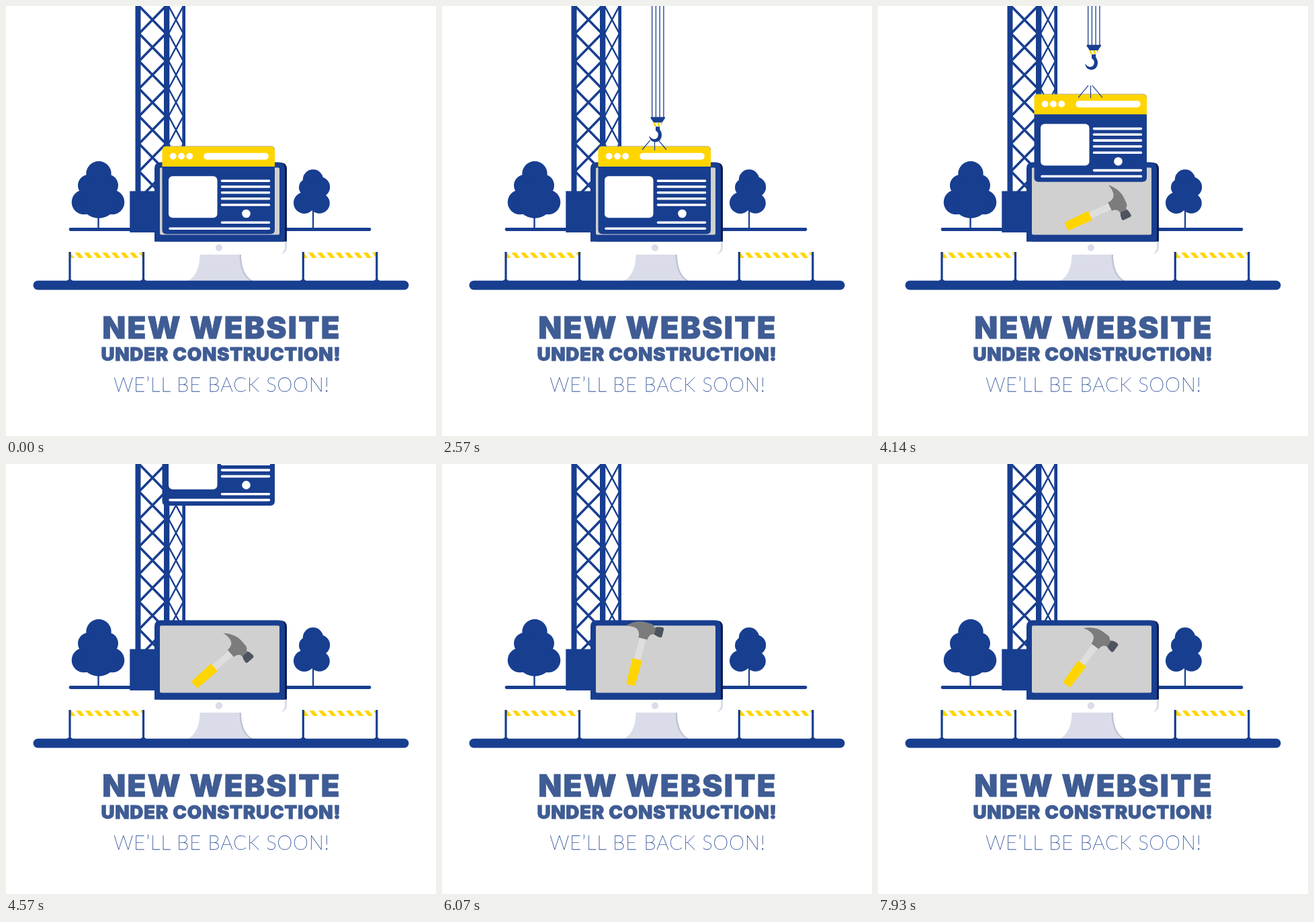
Write an HTML page that moves like this. It is 640x640 px and loops after 8000 ms.

```html
<!DOCTYPE html>
<html lang="en">
<head>
<meta charset="utf-8">
<title>New website under construction</title>
<style>
  html, body { margin: 0; width: 100%; height: 100%; overflow: hidden; background: #fff; }
  svg { display: block; width: 100vw; height: 100vh; }
  text { font-family: Inter, "Open Sans", sans-serif; text-anchor: middle; }
  .b { fill: #183e90; }
  .w { fill: #fff; }
  .y { fill: #ffd500; }
  .line { fill: none; stroke: #183e90; }
  .rule { fill: none; stroke: #fff; stroke-width: 3.6; stroke-linecap: round; }
  .head { fill: #3f5c94; stroke: #3f5c94; stroke-width: .8; font-weight: 900; }
  .soon { fill: #183e90; stroke: #183e90; stroke-width: .3; font-weight: 100; font-family: Lato, Inter, sans-serif; }
</style>
</head>
<body>
<svg viewBox="0 0 640 640">
  <defs>
    <pattern id="tape" width="13.6" height="8" patternUnits="userSpaceOnUse">
      <path class="y" d="M0 0H6.8L12.8 8H6Z"/>
    </pattern>
    <g id="fence">
      <rect x="1.5" y="367" width="110" height="8" fill="#fff"/>
      <svg x="1.5" y="367" width="110" height="8">
        <g class="band"><rect x="-14" width="150" height="8" fill="url(#tape)"/></g>
      </svg>
      <path class="b" d="M0 366H3.2V407L6 409H-3L0 407ZM109.5 366H112.7V407L115.5 409H106.5L109.5 407Z"/>
    </g>
  </defs>

  <path class="line" d="M96 332.5H541" stroke-width="4.8" stroke-linecap="round"/>
  <g id="trees" class="b">
    <path d="M136.3 300H138.7V332H136.3ZM456 295H458.2V332H456Z"/>
  </g>

  <path class="line" id="braceA" stroke-width="3.6"/>
  <path class="line" id="braceB" stroke-width="2.4"/>
  <path class="b" d="M192.5 0H200.5V280H192.5ZM235 0H243.3V240H235ZM262.3 0H267V240H262.3Z"/>
  <rect class="b" x="184.3" y="275.5" width="42" height="61.5"/>

  <path d="M221 370V350H418V360Q418 370 408 370Z" fill="#fff"/>
  <path d="M415 350H418V360Q418 368 408 369.5Q415 366 415 359Z" fill="#dadde9"/>
  <path d="M230 233H409Q418 233 418 243V350.5H230Z" fill="#08194f"/>
  <path class="b" d="M221 350.8V242Q221 232.6 230.5 232.6H405.5Q415 232.6 415 242V350.8Z"/>
  <rect x="229" y="240.5" width="178" height="100" rx="2" fill="#d0d0d0"/>
  <circle cx="317" cy="359.6" r="5.2" fill="#dadde9"/>
  <path d="M288.5 370H350C350 386 354 402 367.5 409H271C284 402 288.5 386 288.5 370Z" fill="#dadde9"/>
  <path d="M347.5 370H350C350 386 354 402 367.5 409H364C351 401 348 386 347.5 370Z" fill="#bfc3d3"/>

  <g id="hammer">
    <rect x="34" y="-5" width="42" height="10" fill="#dedede"/>
    <path class="y" d="M1 -6.7L37.5 -7.5Q38.500 -7.500 38.500 -6.500V6.500Q38.500 7.500 37.500 7.500L1 6.700Q-1 6.500 -1 5V-5Q-1 -6.500 1 -6.700Z"/>
    <path fill="#7c7c7c" d="M82 -30C88 -24 95 -14 95 -4V6Q95 10 91.500 12L91 17H81L80 12Q78 7.500 70.500 7V-6.500Q76 -6.500 79.500 -9C85 -13 84.500 -22 82 -30Z"/>
    <path fill="#4d535f" d="M81 15H92Q94 19 94 25Q93 27 91 27H81Q79 27 78.500 25Q78.500 19 81 15Z"/>
  </g>

  <g id="page">
    <path class="b" d="M232.5 238H400V333Q400 339.5 393.5 339.5H239Q232.5 339.5 232.5 333Z"/>
    <path class="y" d="M232.5 239V214.5Q232.5 209 238 209H394.5Q400 209 400 214.5V239Z"/>
    <path d="M233 213Q234 208.8 238 208.8H394.5Q399.5 209 399.8 214" fill="none" stroke="#9a947a" stroke-width=".7"/>
    <g class="w">
      <circle cx="248.7" cy="223.6" r="4.9"/>
      <circle cx="261" cy="223.6" r="4.9"/>
      <circle cx="273.2" cy="223.6" r="4.9"/>
      <rect x="294.3" y="218.7" width="96.5" height="10" rx="5"/>
      <rect x="242" y="253.3" width="72.5" height="62" rx="6"/>
      <circle cx="357.5" cy="309" r="6.3"/>
    </g>
    <path class="rule" d="M321.5 260.3H391.5M321.5 269H391.5M321.5 277.8H391.5M321.5 286.7H391.5M321.5 296H391.5M321.5 322.3H391.5M244 331.2H391.5"/>
    <path class="line" id="slings" stroke-width="1.2"/>
  </g>

  <g id="hook">
    <path class="line" d="M312.7 -400V166M318.4 -400V166M324.1 -400V166M329.9 -400V166" stroke-width="1.3"/>
    <path class="b" d="M310.6 165.3H331.9V167L327.5 173.5H315L310.6 167Z"/>
    <path class="y" d="M314.5 173.5H317L319.5 179H316ZM319.5 173.5H322.5L325 179H322ZM325 173.5H328L327 178Z"/>
    <path class="b" d="M318 179.5H324.2V184C328 188 328 196 324 200C319 204.5 309 203 308.3 193C312 199 318 200 321 195C323 190 321 187 318 185.5Z"/>
  </g>

  <use href="#fence" x="93.4"/>
  <use href="#fence" x="440.7"/>
  <rect class="b" x="40.5" y="408.8" width="559" height="13.7" rx="6.85"/>

  <text class="head" x="321" y="495" font-size="45.5" letter-spacing="2.2">NEW WEBSITE</text>
  <text class="head" x="320" y="528" font-size="27.8" letter-spacing=".7">UNDER CONSTRUCTION!</text>
  <text class="soon" x="321" y="573.5" font-size="29" letter-spacing="1">WE’LL BE BACK SOON!</text>
</svg>
<script>
const LOOP = 8000;
const $ = id => document.getElementById(id);
const clamp = x => Math.max(0, Math.min(1, x));
const move = (el, x, y) => el.setAttribute("transform", `translate(${x.toFixed(2)} ${y.toFixed(2)})`);

const leaves = [
  [138, 249.7, 18.7], [123, 267, 16], [150.5, 267, 16.5], [116, 292, 18.3],
  [158, 292, 18.3], [138, 288, 28],
  [457, 258.5, 15.2], [449, 270, 13], [467, 269.5, 15.2],
  [444, 293, 16], [466.5, 293.5, 15.3], [457, 284, 18]
];
for (const [cx, cy, r] of leaves) {
  const c = document.createElementNS("http://www.w3.org/2000/svg", "circle");
  for (const [k, v] of Object.entries({ cx, cy, r })) c.setAttribute(k, v);
  $("trees").append(c);
}

const PITCH = 41;
function brace(id, left, right, bottom) {
  let d = "";
  for (let y = 0; y < bottom; y += PITCH)
    d += `M${left} ${y}L${right} ${y + PITCH}M${right} ${y}L${left} ${y + PITCH}`;
  $(id).setAttribute("d", d);
}
brace("braceA", 198, 238, 270);
brace("braceB", 242, 264, 230);

const bands = document.querySelectorAll(".band");
const slingEnds = [[313, 298, 214], [316.5, 316.5, 215], [319, 334, 214]];

// Lift with constant acceleration from a start time.
const lift = (t, start) => -3.33e-4 * Math.max(0, t - start) ** 2;

function draw(t) {
  const down = 1 - clamp((t - 190) / 830);
  move($("hook"), 0, t < 3000 ? -215 * down ** 2.5 : lift(t, 3573));
  move($("page"), 0, lift(t, 3658));

  const grow = clamp((t - 1710) / 1100);
  $("slings").setAttribute("d", grow ? slingEnds.map(([x, x0, y0]) =>
    `M${x0} ${y0}L${x0 + (x - x0) * grow} ${y0 + (196 - y0) * grow}`).join("") : "");

  const angle = 45 + 37 * Math.cos((t - 5965) / 1100 * 2 * Math.PI);
  $("hammer").setAttribute("transform", `translate(281 328) rotate(${-angle.toFixed(2)})`);

  for (const b of bands) move(b, -6 + 3 * t / LOOP, 0);
}

const begin = performance.now();
function tick() {
  draw((performance.now() - begin) % LOOP);
  requestAnimationFrame(tick);
}
draw(0);
requestAnimationFrame(tick);
</script>
</body>
</html>
```
